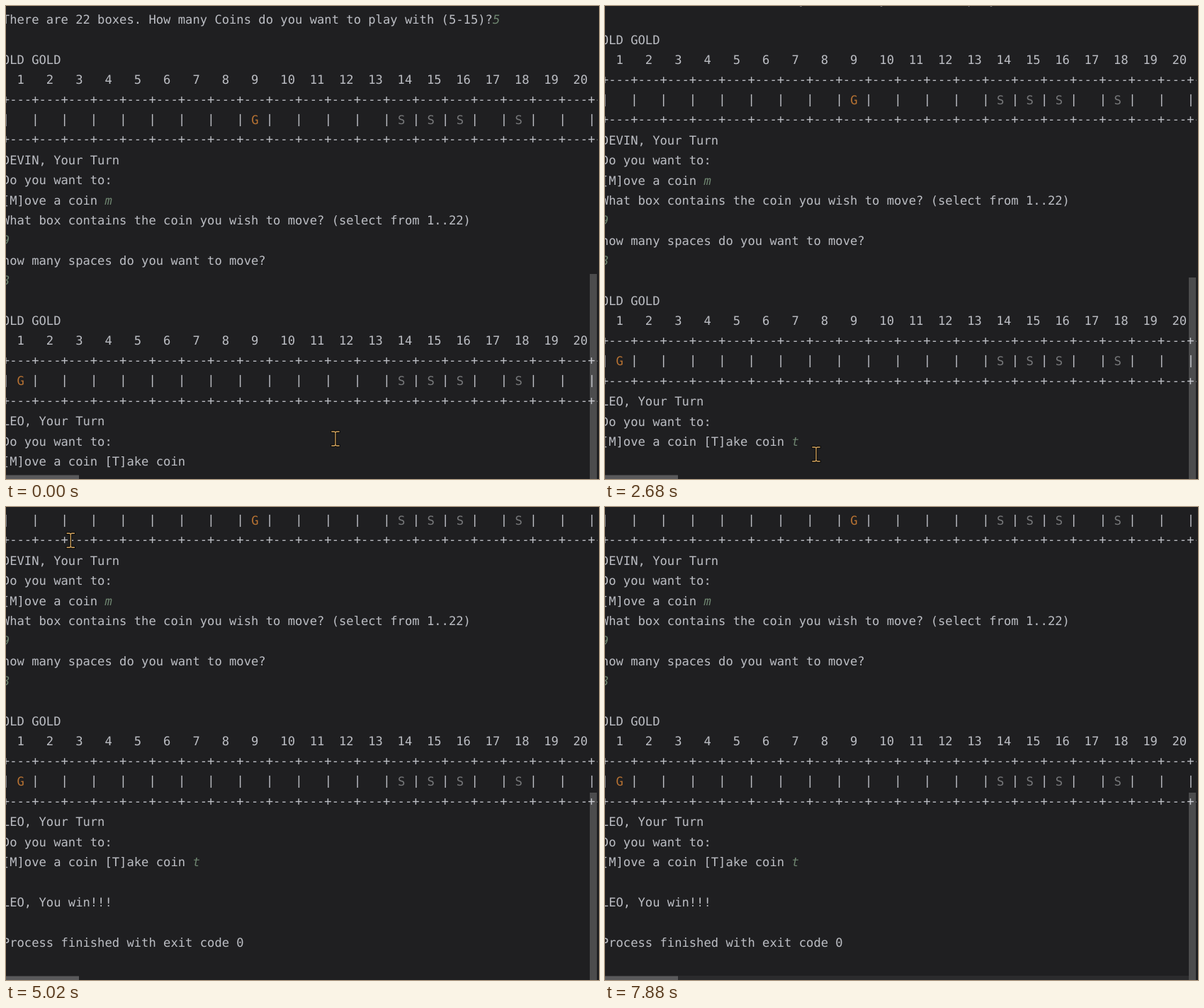
An HTML page for the animation above (8 s loop, 837 by 669 pixels).

```html
<!DOCTYPE html>
<html lang="en">
<head>
<meta charset="utf-8">
<title>Coin game console</title>
<style>
  html, body { margin: 0; width: 100%; height: 100%; overflow: hidden; background: #1f1f21; }
  svg { display: block; width: 837px; height: 669px; }
  text {
    font: 17.166px "DejaVu Sans Mono", "Noto Sans Mono", monospace;
    fill: #bcbec4; white-space: pre; text-rendering: geometricPrecision;
  }
  .grid { baseline-shift: 1.4px; }
  .input { fill: #6e8570; font-style: italic; }
  .gold { fill: #b87333; }
  .silver { fill: #77787a; }
  #pointer use { fill: none; stroke-linecap: square; }
</style>
</head>
<body>
<svg viewBox="0 0 837 669">
  <defs>
    <clipPath id="view"><rect width="835" height="669"/></clipPath>
    <path id="beam" d="M-5-10H-2Q0-10 0-8V8Q0 10-2 10H-5M5-10H2Q0-10 0-8M0 8Q0 10 2 10H5"/>
  </defs>
  <g clip-path="url(#view)"><g id="console"></g></g>
  <rect id="caret" y="631" width="2.4" height="23" fill="#e4e5e8"/>
  <rect id="vbar" x="824" width="10" height="300" fill="#fff" fill-opacity=".2"/>
  <rect id="track" y="663" width="824" height="6" fill="#2b2b2d"/>
  <rect y="663.5" width="103" height="5.5" fill="#59595b"/>
  <g id="pointer">
    <use href="#beam" stroke="#080808" stroke-width="3.4"/>
    <use href="#beam" stroke="#d9a962" stroke-width="1.3"/>
  </g>
</svg>
<script>
const LOOP = 8000, CHAR = 10.335, ROW = 28.41, BASE = 25.4, BOXES = 22, VISIBLE_ROWS = 23;
const TYPED = 2160, ENTERED = 2680, WON = 3350, EXITED = 3440;
const $ = id => document.getElementById(id);

const span = (cls, s) => `<tspan class="${cls}">${s}</tspan>`;
const input = s => span('input', s);
const grid = s => span('grid', s);
const cells = make => Array.from({ length: BOXES }, (_, i) => make(i + 1)).join('');

function board(goldBox) {
  const coin = n => n === goldBox ? span('gold', 'G')
    : [14, 15, 16, 18].includes(n) ? span('silver', 'S') : ' ';
  const border = grid('+---'.repeat(BOXES) + '+');
  return ['OLD GOLD', cells(n => ('  ' + n).padEnd(4)), border,
    cells(n => `${grid('|')} ${coin(n)} `) + grid('|'), border];
}

const lines = [
  'There are 22 boxes. How many Coins do you want to play with (5-15)?' + input('5'),
  '',
  ...board(9),
  'DEVIN, Your Turn',
  'Do you want to:',
  '[M]ove a coin ' + input('m'),
  'What box contains the coin you wish to move? (select from 1..22)',
  input('9'),
  'how many spaces do you want to move?',
  input('8'),
  '',
  ...board(1),
  'LEO, Your Turn',
  'Do you want to:',
  '[M]ove a coin [T]ake coin <tspan id="answer" class="input">t</tspan>',
  '',
  '<tspan id="win">LEO, You win!!!</tspan>',
  '',
  '<tspan id="exit">Process finished with exit code 0</tspan>',
  ''
];
$('console').innerHTML = lines.map((s, i) =>
  `<text x="${-CHAR / 2}" y="${Math.floor(BASE + i * ROW)}">${s}</text>`).join('');

// Each sweep is a quadratic curve that starts where the previous one ended.
const START = [348, 616];
const sweeps = [
  { from: 300, until: 910, bend: [210, 632], end: [298, 634] },
  { from: 3900, until: 4750, bend: [100, 330], end: [20, 15] },
  { from: 4750, until: 5560, bend: [156, 56], end: [116, 140] },
  { from: 5560, until: 6380, bend: [100, 348], end: [86, 443] },
  { from: 6380, until: 7190, bend: [269, 434], end: [212, 574] },
  { from: 7190, until: 7660, bend: [400, 600], end: [672, 690] }
];

function pointerAt(t) {
  if (t < 70) return [465, 612];
  let at = START;
  for (const { from, until, bend, end } of sweeps) {
    if (t < from) break;
    const k = Math.min(1, (t - from) / (until - from)), j = 1 - k;
    at = at.map((a, i) => j * j * a + 2 * j * k * bend[i] + k * k * end[i]);
  }
  return at;
}

const show = (id, on) => $(id).setAttribute('visibility', on ? 'visible' : 'hidden');

function draw(t) {
  const rows = t < ENTERED ? VISIBLE_ROWS : t < WON ? 24 : t < EXITED ? 26 : lines.length;
  const scroll = rows - VISIBLE_ROWS;
  $('console').setAttribute('transform', `translate(0 ${-Math.round(scroll * ROW)})`);
  $('vbar').setAttribute('y', 379 + scroll * 5);

  const typed = t >= TYPED;
  show('answer', typed);
  show('win', t >= WON);
  show('exit', t >= EXITED);
  show('track', t >= 7600);
  show('caret', (t >= 910 && t < 1890) || (typed && t < ENTERED));
  $('caret').setAttribute('x', typed ? 272.8 : 262.8);
  $('pointer').setAttribute('transform', `translate(${pointerAt(t)})`);
}

const start = performance.now();
function tick() {
  draw((performance.now() - start) % LOOP);
  requestAnimationFrame(tick);
}
tick();
</script>
</body>
</html>
```
